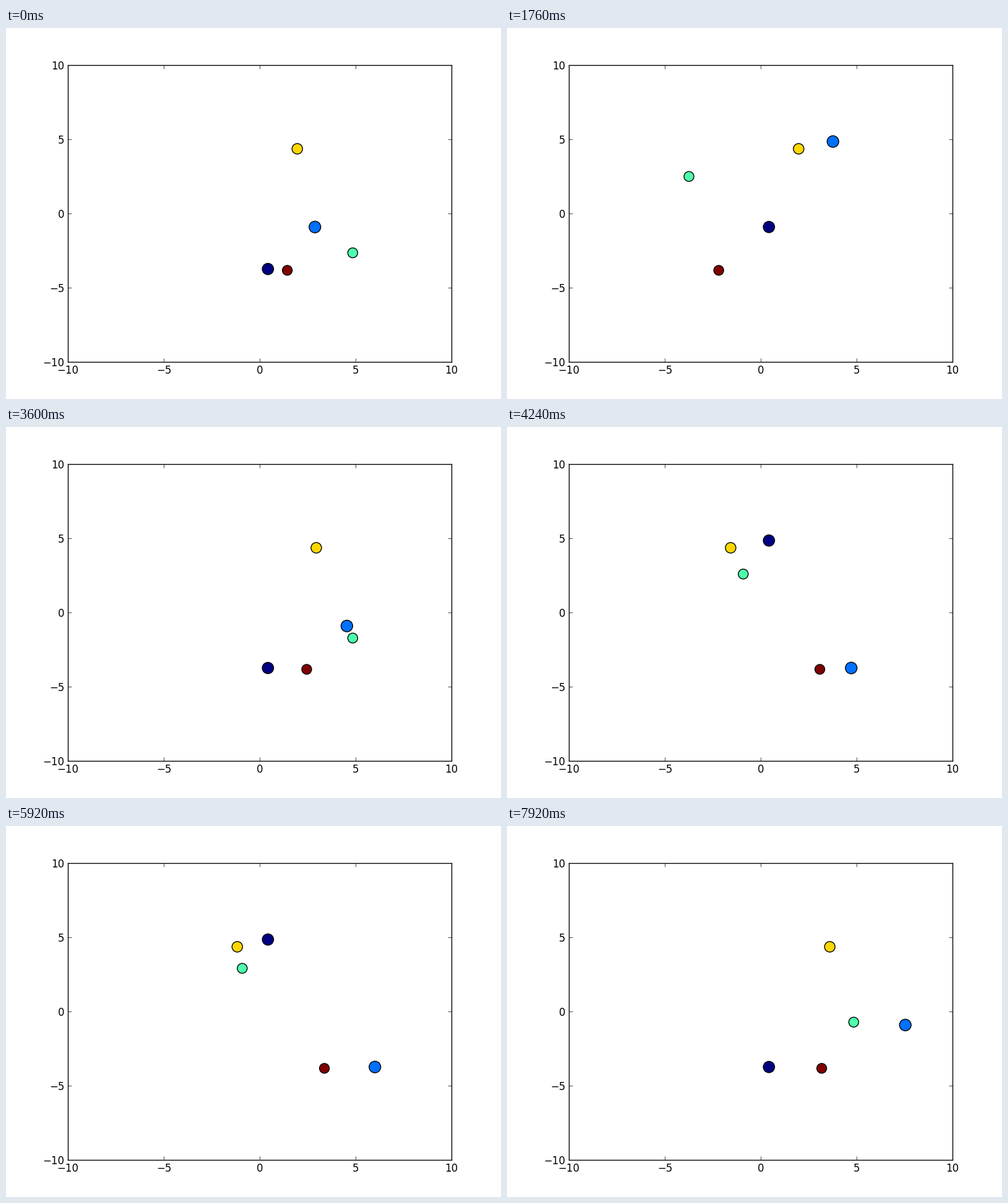
These frames come from a looping animation (800 by 600 pixels, 8 s). A matplotlib script:

```python
import numpy as np
import matplotlib.pyplot as plt
from matplotlib.animation import FuncAnimation

FRAMES = 100
INTERVAL = 80

plt.style.use("classic")
plt.rcParams.update({
    "font.family": "DejaVu Sans",
    "xtick.major.pad": 3.3,
    "ytick.alignment": "center_baseline",
})

# Three coordinates trade places on every step without changing value.
SWAP = np.array([-3.74, -0.91, 4.85])

# Three more rotate the same way while they grow: start, speed, slowdown.
START = np.array([-2.65, 1.96, 1.44])
SPEED = np.array([0.0215, 0.0265, 0.0265])
SLOWDOWN = np.array([0.00002, 0.0001, 0.00009])

COLORS = ["#000080", "#0070ff", "#4dffaa", "#ffd700", "#800000"]
DIAMETERS = np.array([18.3, 18.8, 16.0, 17.0, 15.9])  # pixels


def positions(step):
    a, b, c = np.roll(SWAP, -step)
    grown = START + SPEED * step - SLOWDOWN * step ** 2
    green_y, yellow_x, red_x = np.roll(grown, -step)
    blue_x = np.interp(step, [0, 37, 53, 99], [2.88, 4.37, 4.72, 7.54])
    return [
        (0.43, a),
        (blue_x, b),
        (c, green_y),
        (yellow_x, 4.36),
        (red_x, -3.83),
    ]


fig = plt.figure(figsize=(8, 6), dpi=100, facecolor="white")
ax = fig.add_axes([0.125, 0.1, 0.775, 0.8])
ax.set_xticks(range(-10, 11, 5))
ax.set_yticks(range(-10, 11, 5))

x, y = zip(*positions(0))
dots = ax.scatter(x, y, s=(DIAMETERS * 72 / fig.dpi) ** 2,
                  c=COLORS, edgecolors="black", linewidths=1.0)
ax.set(xlim=(-10, 10), ylim=(-10, 10))


def update(step):
    dots.set_offsets(positions(step))
    return (dots,)


anim = FuncAnimation(fig, update, frames=FRAMES, interval=INTERVAL,
                     repeat=True, repeat_delay=0)
plt.show()
```
